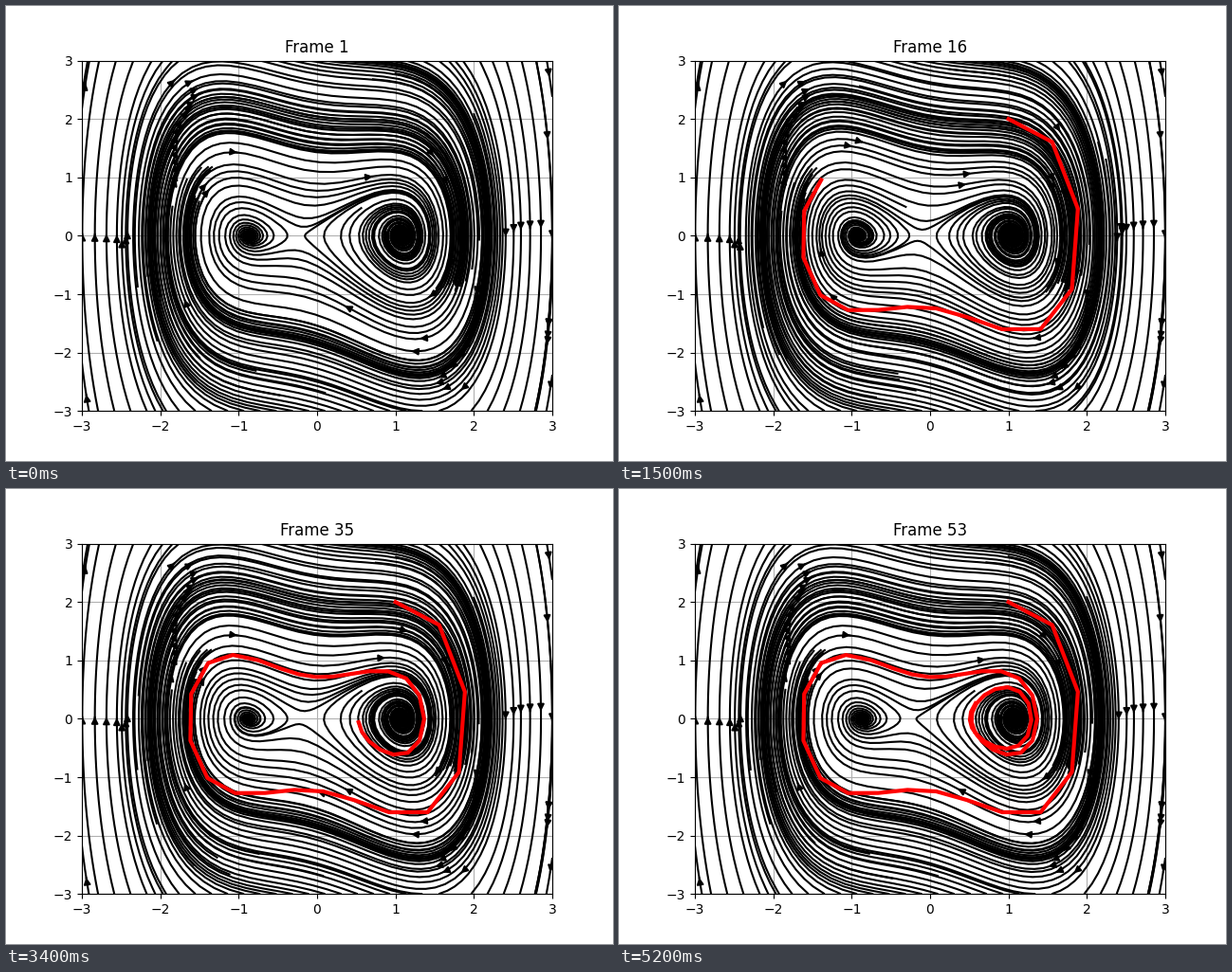
Write a matplotlib script that moves like this. It is 640 px wide and 480 px high and loops after 5.3 s.

```python
import math

import numpy as np
import matplotlib.pyplot as plt
from matplotlib.animation import FuncAnimation
from matplotlib.collections import LineCollection
from matplotlib.patches import FancyArrowPatch

DAMPING, DRIVE, OMEGA = 0.3, 0.2, 1.2
DT, FRAMES = 0.3, 53
LIM = 3.0
NODES = 30            # samples of the field per side
CELLS = 30            # seeding grid per side
MAX_STEP = 1 / CELLS  # lengths below are fractions of the axes
MAX_ERROR = 0.003
HALF_LENGTH = 2.0
MIN_LENGTH = 0.1

axis = np.linspace(-LIM, LIM, NODES)
X, V = np.meshgrid(axis, axis)


def force(t):
    return DRIVE * math.cos(OMEGA * t)


def accel(x, v, push):
    return x - x ** 3 - DAMPING * v + push


def solve(x, v, substeps=20):
    """Runge-Kutta path of the driven oscillator, sampled every DT."""
    def rate(t, s):
        return np.array([s[1], accel(s[0], s[1], force(t))])

    h = DT / substeps
    state, path = np.array([x, v]), []
    for i in range(FRAMES * substeps):
        t = i * h
        if i % substeps == 0:
            path.append(state)
        a = rate(t, state)
        b = rate(t + h / 2, state + h / 2 * a)
        c = rate(t + h / 2, state + h / 2 * b)
        d = rate(t + h, state + h * c)
        state = state + h / 6 * (a + 2 * b + 2 * c + d)
    return np.array(path)


def sampled_field(push):
    """Direction field, interpolated bilinearly between the nodes."""
    A = accel(X, V, push)
    accels, speeds = A.tolist(), np.hypot(V, A).tolist()
    last = NODES - 1

    def heading(p, q):
        gx, gy = p * last, q * last
        i, j = min(int(gx), last - 1), min(int(gy), last - 1)
        fx, fy = gx - i, gy - j

        def blend(rows):
            lo, hi = rows[j], rows[j + 1]
            a = lo[i] + fx * (lo[i + 1] - lo[i])
            b = hi[i] + fx * (hi[i + 1] - hi[i])
            return a + fy * (b - a)

        speed = blend(speeds)
        return (2 * LIM * q - LIM) / speed, blend(accels) / speed

    return heading


def inside(p, q):
    return 0 <= p <= 1 and 0 <= q <= 1


def spiral(n):
    """Cells of an n by n grid, from the border inwards."""
    x0, y0, x1, y1 = 0, 1, n - 1, n - 1
    x = y = 0
    way = 0
    for _ in range(n * n):
        yield x, y
        if way == 0:
            x += 1
            if x >= x1:
                x1 -= 1
                way = 1
        elif way == 1:
            y += 1
            if y >= y1:
                y1 -= 1
                way = 2
        elif way == 2:
            x -= 1
            if x <= x0:
                x0 += 1
                way = 3
        else:
            y -= 1
            if y <= y0:
                y0 += 1
                way = 0


def to_edge(pos, slope):
    if slope == 0:
        return math.inf
    return pos / -slope if slope < 0 else (1 - pos) / slope


def trace(p, q, heading, sign, visited):
    """Follow the field with adaptive Heun steps in axes fractions."""
    points, total, ds = [], 0.0, MAX_STEP
    while True:
        points.append((p, q))
        ux, uy = heading(p, q)
        ux, uy = sign * ux, sign * uy
        pe, qe = p + ds * ux, q + ds * uy
        if not inside(pe, qe):
            ds = min(to_edge(p, ux), to_edge(q, uy))
            points.append((p + ds * ux, q + ds * uy))
            return total + ds, points
        wx, wy = heading(pe, qe)
        wx, wy = sign * wx, sign * wy
        error = 0.5 * ds * math.hypot(wx - ux, wy - uy)
        if error < MAX_ERROR:
            p += 0.5 * ds * (ux + wx)
            q += 0.5 * ds * (uy + wy)
            if not inside(p, q):
                return total, points
            visited.add((round(p * (CELLS - 1)), round(q * (CELLS - 1))))
            if total + ds > HALF_LENGTH:
                return total, points
            total += ds
        if error == 0:
            ds = MAX_STEP
        else:
            ds = min(MAX_STEP, 0.85 * ds * math.sqrt(MAX_ERROR / error))


def streamlines(push):
    heading = sampled_field(push)
    taken, lines = set(), []
    for cell in spiral(CELLS):
        if cell in taken:
            continue
        p, q = cell[0] / (CELLS - 1), cell[1] / (CELLS - 1)
        visited = {cell}
        back_len, back = trace(p, q, heading, -1, visited)
        fore_len, fore = trace(p, q, heading, 1, visited)
        if back_len + fore_len > MIN_LENGTH:
            taken |= visited
            lines.append(np.array(back[::-1] + fore[1:]) * 2 * LIM - LIM)
    return lines


def midway_arrow(line):
    s = np.cumsum(np.hypot(*np.diff(line, axis=0).T))
    n = np.searchsorted(s, s[-1] / 2)
    return FancyArrowPatch(line[n], line[n:n + 2].mean(axis=0),
                           arrowstyle="-|>", mutation_scale=10,
                           linewidth=1.5, color="k", zorder=2,
                           transform=ax.transData)


fig, ax = plt.subplots(figsize=(6.4, 4.8), dpi=100)
ax.set_xlim(-LIM, LIM)
ax.set_ylim(-LIM, LIM)
ax.grid(True)
title = ax.set_title("Frame 1")
flow = ax.add_collection(LineCollection([], colors="k", linewidths=1.5, zorder=2),
                         autolim=False)
trail, = ax.plot([], [], "r-", lw=3, zorder=2.2)
path = solve(1.0, 2.0)
arrows = []


def update(i):
    while arrows:
        arrows.pop().remove()
    lines = streamlines(force(i * DT))
    flow.set_segments(lines)
    for line in lines:
        arrows.append(ax.add_artist(midway_arrow(line)))
    trail.set_data(path[:i, 0], path[:i, 1])
    title.set_text(f"Frame {i + 1}")
    return [flow, trail, title, *arrows]


anim = FuncAnimation(fig, update, frames=FRAMES, interval=100,
                     repeat=True, repeat_delay=0, blit=False)
plt.show()
```
